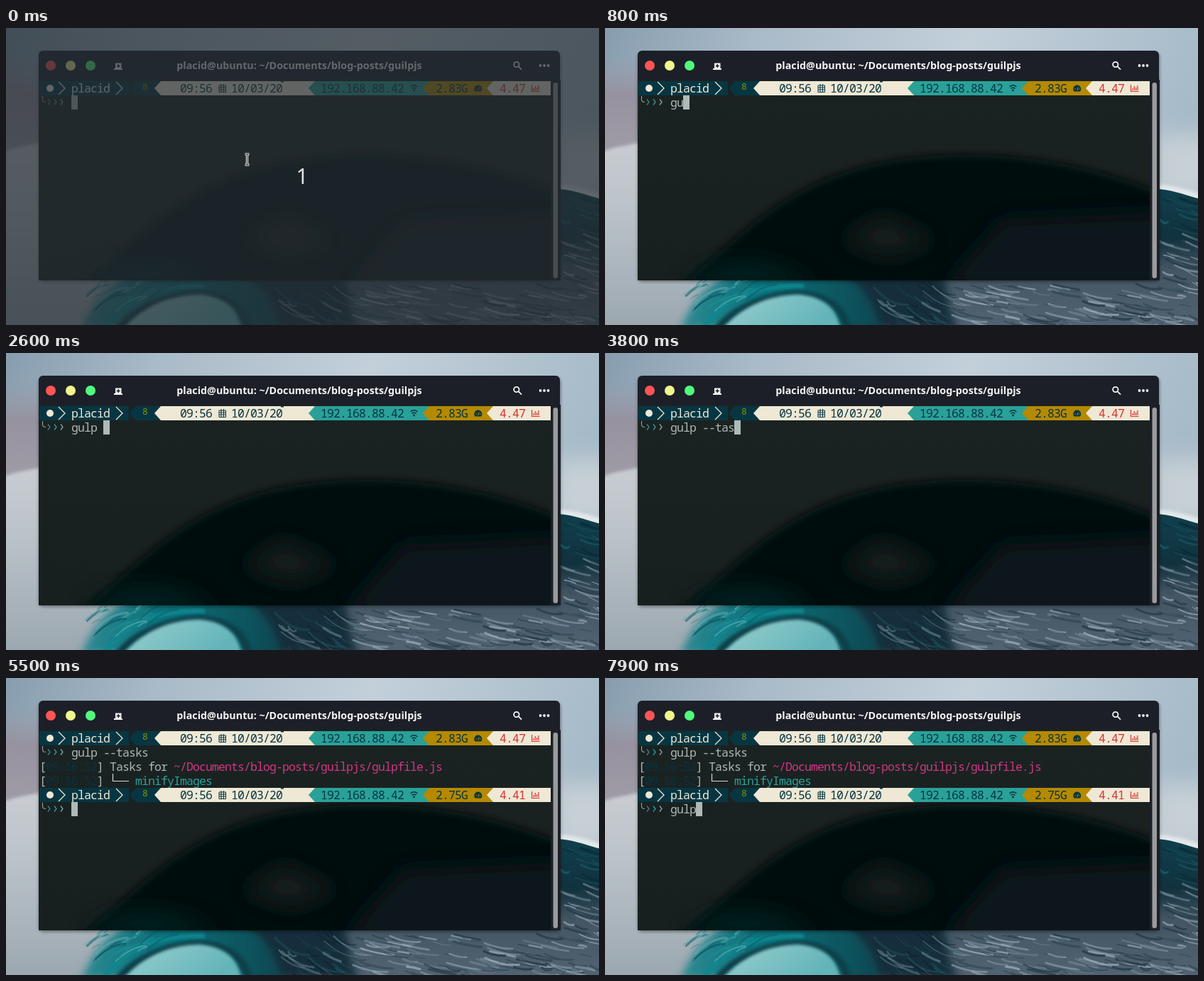
An HTML page that plays this animation: 835x419 px, repeating every 8 s.

```html
<!DOCTYPE html>
<html lang="en">
<head>
<meta charset="utf-8">
<title>Terminal session</title>
<style>
  html, body { margin: 0; width: 100%; height: 100%; overflow: hidden; background: #26343c; }
  svg { display: block; width: 835px; height: 419px; }
  .mono { font: 16.5px "Noto Sans Mono", "DejaVu Sans Mono", monospace; letter-spacing: -0.9px; white-space: pre; }
  .title { font: bold 14.3px "Noto Sans", "Open Sans", sans-serif; fill: #f4f4f2; text-anchor: middle; }
  .count { font: 30px "Noto Sans", "Open Sans", sans-serif; fill: #dfe2e2; text-anchor: middle; }
</style>
</head>
<body>
<svg viewBox="0 0 835 419" xmlns="http://www.w3.org/2000/svg">
  <defs>
    <linearGradient id="sky" x2="1" y2="0.2">
      <stop offset="0" stop-color="#879dae"/>
      <stop offset=".25" stop-color="#a9bac8"/>
      <stop offset=".6" stop-color="#c3d0da"/>
      <stop offset="1" stop-color="#a6bac8"/>
    </linearGradient>
    <linearGradient id="haze" x2="0" y2="1">
      <stop offset="0" stop-color="#9c99a7" stop-opacity="0"/>
      <stop offset=".3" stop-color="#96929f"/>
      <stop offset="1" stop-color="#a4a1ab"/>
    </linearGradient>
    <linearGradient id="mist" x2="0" y2="1">
      <stop offset="0" stop-color="#c9cdd2"/>
      <stop offset=".4" stop-color="#b9c1c8"/>
      <stop offset="1" stop-color="#9aa6ae"/>
    </linearGradient>
    <linearGradient id="swell" x2="0" y2="1">
      <stop offset="0" stop-color="#0f3f4b"/>
      <stop offset=".35" stop-color="#11323e"/>
      <stop offset=".55" stop-color="#435563"/>
      <stop offset="1" stop-color="#536574"/>
    </linearGradient>
    <linearGradient id="curl" x2="1" y2="0">
      <stop offset="0" stop-color="#2d8a92"/>
      <stop offset=".4" stop-color="#0d7079"/>
      <stop offset="1" stop-color="#0a4852"/>
    </linearGradient>
    <linearGradient id="lit" x2="1" y2=".4">
      <stop offset="0" stop-color="#9bcfd0"/>
      <stop offset="1" stop-color="#62b4b8"/>
    </linearGradient>
    <linearGradient id="pane" x2="0" y2="1">
      <stop offset="0" stop-color="#1b2322"/>
      <stop offset="1" stop-color="#171f1f"/>
    </linearGradient>
    <filter id="b1"><feGaussianBlur stdDeviation=".7"/></filter>
    <filter id="b2" x="-20%" y="-20%" width="140%" height="140%"><feGaussianBlur stdDeviation="2"/></filter>
    <filter id="b6" x="-40%" y="-40%" width="180%" height="180%"><feGaussianBlur stdDeviation="6"/></filter>
    <filter id="b16" x="-60%" y="-60%" width="220%" height="220%"><feGaussianBlur stdDeviation="16"/></filter>
    <clipPath id="paneClip"><path d="M46 73H767V356H46Z"/></clipPath>
  </defs>

  <g id="sea">
    <path fill="url(#sky)" d="M0 0H835V419H0Z"/>
    <path fill="url(#haze)" d="M0 40H60V220H0Z"/>
    <path fill="#c7d0d6" filter="url(#b16)" d="M770 150H860V240H770Z"/>
    <path fill="url(#mist)" filter="url(#b2)" d="M-10 178C10 166 30 168 60 158L300 330V430H-10Z"/>
    <path fill="#e3e8ea" filter="url(#b2)" d="M775 220Q810 223 845 236V246Q810 238 775 232Z"/>
    <path fill="url(#swell)" filter="url(#b1)" d="M340 330L770 227C800 227 815 236 845 243V430H340Z"/>
    <path fill="#142f3b" filter="url(#b6)" d="M300 340H470C490 370 478 400 500 425H340Z"/>
    <path fill="url(#curl)" filter="url(#b6)" d="M105 425C130 380 140 340 260 334C350 336 375 372 388 425Z"/>
    <path fill="none" stroke="#10868f" stroke-width="7" filter="url(#b2)" d="M138 425C165 380 215 362 280 364"/>
    <path fill="none" stroke="#07404a" stroke-width="10" filter="url(#b2)" d="M158 425C195 375 325 345 342 425"/>
    <path fill="url(#lit)" filter="url(#b2)" d="M166 424C192 394 228 377 272 376C312 379 328 400 331 424Z"/>
    <g id="foam" fill="none" stroke-linecap="round" filter="url(#b1)"/>
  </g>

  <rect x="46" y="35" width="735" height="323" rx="6" opacity=".4" filter="url(#b2)"/>
  <path fill="#1c1f28" d="M46 38a6 6 0 0 1 6-6H774a6 6 0 0 1 6 6V73h1V356H46Z"/>
  <g clip-path="url(#paneClip)">
    <path fill="url(#pane)" d="M46 73H767V356H46Z"/>
    <path fill="#06110f" filter="url(#b6)" d="M100 366C170 318 225 240 340 203C430 172 610 160 790 236V370Z"/>
    <path fill="#062628" filter="url(#b16)" opacity=".8" d="M110 365C150 322 220 312 300 365Z"/>
    <path fill="#161f1e" filter="url(#b16)" d="M330 300L390 262L470 300L400 325Z"/>
    <path fill="#10191a" filter="url(#b16)" d="M470 370L560 270L780 260V370Z"/>
  </g>
  <rect x="770.5" y="77" width="6.5" height="276" rx="3.2" fill="#9a9b9c"/>

  <circle cx="63" cy="53" r="7" fill="#ff5555"/>
  <circle cx="91" cy="53" r="7" fill="#f1f68c"/>
  <circle cx="119" cy="53" r="7" fill="#50fa7b"/>
  <g fill="#f4f4f2">
    <path d="M154 49.500h8.500v7.500h1.500v2h-12v-2h2Z"/>
    <path fill="#1c1f28" d="M157.500 51h1.500v1.800h1.800v1.500h-1.800v1.800h-1.500v-1.800h-1.800v-1.500h1.800Z"/>
    <circle cx="752.500" cy="53" r="1.900"/><circle cx="758" cy="53" r="1.900"/><circle cx="763.500" cy="53" r="1.900"/>
  </g>
  <g fill="none" stroke="#f4f4f2" stroke-width="1.800"><circle cx="718.800" cy="51.500" r="3.700"/><path d="M721.500 54.200L726 58.700"/></g>
  <text id="title" class="title" x="413" y="58"></text>

  <g id="term"></g>
  <rect id="caret" width="9" height="20" fill="#adbab6"/>

  <g id="dim">
    <path fill="#252d32" opacity=".7" d="M0 0H835V419H0Z"/>
    <text class="count" x="417" y="220">1</text>
  </g>
  <g id="mouse" fill="none">
    <path stroke="#fff" stroke-width="3.200" d="M-3-7.500H3M0-7.500V7.500M-3 7.500H3"/>
    <path stroke="#111" stroke-width="1" d="M-3-7.500H3M0-7.500V7.500M-3 7.500H3"/>
  </g>
</svg>

<script>
const $ = id => document.getElementById(id);
const LOOP = 8000, CELL = 9, ROW = 20, LEFT = 47, TOP = 75;
const C = { navy: '#073642', cream: '#eee8d5', teal: '#2aa198', gold: '#b58900',
            red: '#dc322f', pink: '#d33682', text: '#adb8b4', green: '#859900' };
const user = 'placid', cwd = '~/Documents/blog-posts/guilpjs';

function add(parent, tag, attrs, text) {
  const el = document.createElementNS('http://www.w3.org/2000/svg', tag);
  for (const k in attrs) el.setAttribute(k, attrs[k]);
  if (text !== undefined) el.textContent = text;
  parent.append(el);
  return el;
}
const fill = (g, d, color) => add(g, 'path', { d, fill: color });
const line = (g, d, color, w = 1.3) =>
  add(g, 'path', { d, fill: 'none', stroke: color, 'stroke-width': w });
const write = (g, row, col, text, color) => add(g, 'text',
  { class: 'mono', x: LEFT + col * CELL, y: TOP + row * ROW + 16, fill: color }, text);

// Seeded streaks of light and shade on the water
let seed = 7;
const rand = () => (seed = seed * 16807 % 2147483647) / 2147483647;
function streaks(count, [x0, y0, x1, y1], slope, colors) {
  for (let i = 0; i < count; i++) {
    const w = 10 + rand() * 40;
    const x = x0 + rand() * (x1 - x0), y = y0 + rand() * (y1 - y0);
    add($('foam'), 'path', {
      d: `M${x} ${y}q${w / 2} ${w * slope - 4 + rand() * 8} ${w} ${w * slope}`,
      stroke: colors[i % colors.length], 'stroke-width': 1 + rand() * 2.5, opacity: 0.35 + rand() * 0.45
    });
  }
}
const slate = ['#a3b2be', '#243945', '#8195a3', '#314854'];
streaks(110, [480, 360, 835, 419], 0.2, slate);
streaks(30, [780, 290, 835, 365], 0.3, slate);
streaks(14, [780, 240, 835, 285], 0.25, ['#0a2b36', '#1d5f6b']);
streaks(30, [375, 358, 475, 419], 0.5, ['#0c1f29', '#567380', '#1d4a56']);
streaks(24, [110, 358, 200, 400], -0.5, ['#6fb0b5', '#0a5a64', '#1c8f97']);

// One powerline status row plus the input row under it
function prompt(row, mem, load) {
  const g = add($('term'), 'g', {}), y = TOP + row * ROW, m = y + 10, b = y + ROW;
  const arrow = (tip, end, color) =>
    fill(g, `M${tip} ${m}L${tip + 9} ${y}H${end}V${b}H${tip + 9}Z`, color);
  fill(g, `M47 ${y}H173V${b}H47Z`, C.navy);
  arrow(174, 218, C.navy);
  arrow(209, 435, C.cream);
  arrow(426, 597, C.teal);
  arrow(587, 686, C.gold);
  arrow(677, 767, C.cream);

  add(g, 'circle', { cx: 62, cy: m, r: 5, fill: C.cream });
  for (const x of [74, 155]) line(g, `M${x} ${y + 1}L${x + 9} ${m}L${x} ${b - 1}`, C.cream);
  write(g, row, 5, user, C.cream);
  add(g, 'text', { class: 'mono', x: 192, y: y + 11.5, fill: C.green, style: 'font-size:13px' }, '8');
  write(g, row, 22, '09:56', C.navy);
  write(g, row, 30, '10/03/20', C.navy);
  fill(g, `M387 ${y}h4v1.500h-4Z`, C.navy);
  write(g, row, 44, '192.168.88.42', C.navy);
  write(g, row, 62, mem, C.navy);
  write(g, row, 72, load, C.red);

  // calendar, wifi, gauge, chart
  line(g, `M300 ${y + 6}h9.500v9.500h-9.500ZM300 ${y + 9}h9.500M300 ${y + 12}h9.500M303 ${y + 4}v11M306.500 ${y + 4}v11`, C.navy, 1);
  line(g, `M569.500 ${y + 8}q5-4.500 10 0M571.500 ${y + 10.500}q3-2.500 6 0`, C.navy, 1.600);
  add(g, 'circle', { cx: 574.5, cy: y + 13, r: 1.4, fill: C.navy });
  fill(g, `M660.500 ${y + 14.500}a5.500 5.500 0 1 1 8.500 0Z`, C.navy);
  line(g, `M664.700 ${y + 13}l1.500-4.500M661.500 ${y + 11}h1.500M667 ${y + 11}h1.500`, C.gold, 1);
  line(g, `M740.500 ${y + 5}v9.500h11M743 ${y + 13}v-3M745.300 ${y + 13}v-6M747.600 ${y + 13}v-4M749.900 ${y + 13}v-7`, C.red, 1.200);

  line(g, `M51.500 ${b + 1}v5q0 3.500 4.500 3.500`, '#93a1a1', 1.100);
  ['#3f8391', '#2aa198', '#7fa9a8'].forEach((color, i) =>
    line(g, `M${59 + i * CELL} ${b + 5.500}l3 4l-3 4`, color));
  return { g, input: write(g, row + 1, 5, '', C.text) };
}

const first = prompt(0, '2.83G', '4.47');
const output = add($('term'), 'g', {});
for (const row of [2, 3]) {
  write(output, row, 0, '[', C.text);
  write(output, row, 1, '09:56:52', '#0a333e');
  write(output, row, 9, ']', C.text);
}
write(output, 2, 11, 'Tasks for', C.text);
write(output, 2, 21, cwd + '/gulpfile.js', C.pink);
line(output, 'M150.500 135V145.500H173', '#d5dad6', 1.200);
write(output, 3, 15, 'minifyImages', C.teal);
const second = prompt(4, '2.75G', '4.41');

// Step tables: [start time, value]
const typed1 = [[0, ''], [700, 'g'], [800, 'gu'], [1000, 'gul'], [1400, 'gul '], [1500, 'gul p'],
  [2000, 'gul '], [2200, 'gul'], [2400, 'gulp'], [2600, 'gulp '], [2900, 'gulp -'], [3100, 'gulp --'],
  [3500, 'gulp --t'], [3600, 'gulp --ta'], [3800, 'gulp --tas'], [3900, 'gulp --tasks']];
const typed2 = [[0, ''], [7300, 'g'], [7400, 'gu'], [7700, 'gul'], [7900, 'gulp']];
const blink = [[0, 1], [300, 0], [700, 1], [4900, 0], [5400, 1], [6000, 0], [6600, 1], [7100, 0], [7300, 1]];
const caretRow = [[0, 1], [4100, 2], [4600, 4], [4800, 5]];
const pointer = [[0, [339.5, 185.5]], [700, null], [5300, [337.5, 186]], [5400, [337.5, 105]], [5500, null],
  [5900, [364, 8]], [6000, [341, 112]], [6100, [325.5, 196]], [7300, null]];
const titles = [[0, `${user}@ubuntu: ${cwd}`], [4200, 'gulp --tasks'], [4600, `${user}@ubuntu: ${cwd}`]];

const at = (steps, t) => steps.reduce((v, s) => t >= s[0] ? s[1] : v, steps[0][1]);
const show = (el, on) => el.setAttribute('visibility', on ? 'visible' : 'hidden');
const setText = (el, s) => { if (el.textContent !== s) el.textContent = s; };

function draw(t) {
  const a = at(typed1, t), b = at(typed2, t), row = at(caretRow, t), pos = at(pointer, t);
  setText(first.input, a);
  setText(second.input, b);
  setText($('title'), at(titles, t));
  show(output, t >= 4600);
  show(second.g, t >= 4800);
  show($('dim'), t < 100);

  const col = row === 1 ? 5 + a.length : row === 5 ? 5 + b.length : 0;
  $('caret').setAttribute('x', LEFT + col * CELL);
  $('caret').setAttribute('y', TOP + row * ROW);
  show($('caret'), at(blink, t));

  show($('mouse'), pos);
  if (pos) $('mouse').setAttribute('transform', `translate(${pos})`);
}

const start = performance.now();
function tick() {
  draw((performance.now() - start) % LOOP);
  requestAnimationFrame(tick);
}
tick();
</script>
</body>
</html>
```
